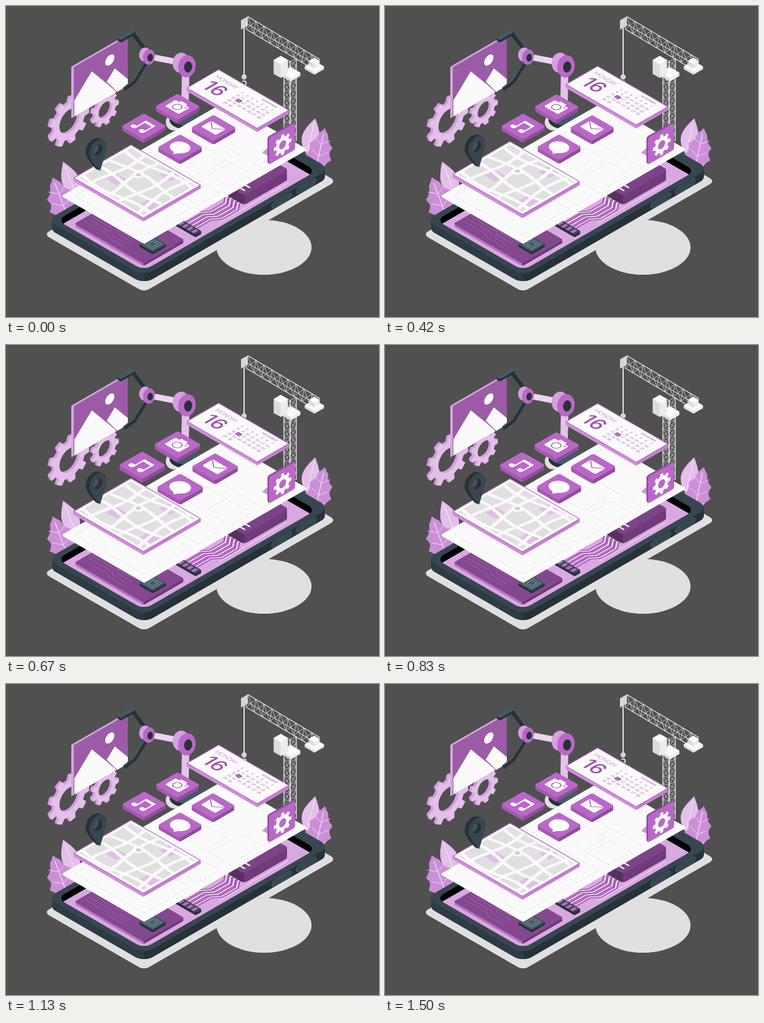
Recreate the animation shown at these times as an HTML page with a canvas. Size 600 by 500 pixels, loop 1.54 s.

```html
<!DOCTYPE html>
<html lang="en">
<head>
<meta charset="utf-8">
<title>App building site</title>
<style>
html, body { margin: 0; width: 100%; height: 100%; overflow: hidden; background: #505050; }
canvas { display: block; }
</style>
</head>
<body>
<canvas id="stage" width="600" height="500"></canvas>
<script>
const ctx = document.getElementById('stage').getContext('2d');
const LOOP = 1540, BEAT = 1500, LEAD = 20;
const K = 0.577, TAU = Math.PI * 2;
const FLOOR = [1, K, -1, K], WALL = [1, -K, 0, 1];
const PURPLE = '#ba68c8', DARK = '#37474f', DARKER = '#263238', STEEL = '#455a64';
const GREY = '#e0e0e0', PALE = '#e3bfe9', LILAC = '#d9a8e2', WHITE = '#fafafa';

function plane(m, x, y, draw) {
  ctx.save();
  ctx.transform(...m, x, y);
  draw();
  ctx.restore();
}

function box(x, y, w, h, r, fill) {
  ctx.beginPath();
  ctx.roundRect(x, y, w, h, r);
  ctx.fillStyle = fill;
  ctx.fill();
}

function trace(points) {
  ctx.beginPath();
  for (const [x, y] of points) ctx.lineTo(x, y);
}

function poly(fill, ...points) {
  trace(points);
  ctx.fillStyle = fill;
  ctx.fill();
}

function line(color, width, ...points) {
  trace(points);
  ctx.lineJoin = 'round';
  ctx.strokeStyle = color;
  ctx.lineWidth = width;
  ctx.stroke();
}

function oval(x, y, rx, ry, fill, turn = 0) {
  ctx.beginPath();
  ctx.ellipse(x, y, rx, ry, turn, 0, TAU);
  ctx.fillStyle = fill;
  ctx.fill();
}

// Points of a curve sampled for s = 0..1.
const sample = (n, at) => Array.from({ length: n + 1 }, (_, i) => at(i / n));

function seeded(seed) {
  return () => (seed = seed * 16807 % 2147483647) / 2147483647;
}

// Isometric block; x, y is the far corner of its upper face.
function slab(x, y, w, h, r, depth, top, left, right) {
  for (let d = depth; d > 0; d--) {
    plane(FLOOR, x, y + d, () => {
      const side = ctx.createLinearGradient(w - 50, h + 50, w + 50, h - 50);
      side.addColorStop(0.5, left);
      side.addColorStop(0.5, right);
      box(0, 0, w, h, r, side);
    });
  }
  plane(FLOOR, x, y, () => box(0, 0, w, h, r, top));
}

const whiteBlock = (x, y, size, depth) => slab(x, y, size, size, 0, depth, WHITE, '#dcdcdc', '#ececec');

function gear(x, y, radius, body, hole, teeth, fill) {
  const step = TAU / teeth;
  plane([0.866, -0.5, 0, 1], x, y, () => {
    ctx.beginPath();
    for (let i = 0; i < teeth; i++) {
      for (const [part, r] of [[-0.3, body], [-0.2, radius], [0.2, radius], [0.3, body]]) {
        const a = (i + part) * step;
        ctx.lineTo(r * Math.cos(a), r * Math.sin(a));
      }
    }
    ctx.closePath();
    ctx.moveTo(hole, 0);
    ctx.arc(0, 0, hole, 0, TAU);
    ctx.fillStyle = fill;
    ctx.fill('evenodd');
  });
}

function thickGear(x, y, radius) {
  for (let d = 5; d >= 0; d--) {
    gear(x - d * 0.8, y - d * 0.4, radius, radius * 0.78, radius * 0.5, 9, d ? '#d3a0dd' : PALE);
  }
}

// A leaf growing upwards from its base, with scalloped edges if it has lobes.
function leaf(x, y, length, width, turn, lobes, fill) {
  ctx.save();
  ctx.translate(x, y);
  ctx.rotate(turn);
  const edge = side => sample(48, s => {
    const scallop = lobes ? 1 - 0.25 * Math.abs(Math.cos(Math.PI * lobes * s)) : 1;
    return [side * width * Math.sin(Math.PI * s ** 0.85) * scallop, -length * s];
  });
  poly(fill, ...edge(-1), ...edge(1).reverse());
  line('#f3e3f6', 1.2, [0, 0], [0, -length * 0.88]);
  for (let i = 1; i < lobes; i++) {
    const stem = -length * (i - 0.4) / lobes;
    for (const side of [-1, 1]) line('#f3e3f6', 0.8, [0, stem], [side * width * 0.6, stem - 9]);
  }
  ctx.restore();
}

function leaves() {
  leaf(484, 238, 59, 14, 0.23, 0, PALE);
  leaf(496, 272, 78, 22, 0.22, 4, '#cb8fd7');
  leaf(114, 306, 60, 14, -0.38, 0, PALE);
  leaf(104, 352, 82, 25, -0.36, 4, '#cb8fd7');
}

function truss(x1, y1, x2, y2, dx, dy, cells) {
  const at = (i, side) => [x1 + (x2 - x1) * i / cells + dx * side, y1 + (y2 - y1) * i / cells + dy * side];
  for (const side of [0, 1]) line('#eee', 1.3, at(0, side), at(cells, side));
  for (let i = 0; i < cells; i++) {
    line(GREY, 0.8, at(i, 0), at(i + 1, 1));
    line(GREY, 0.8, at(i, 1), at(i + 1, 0));
    line(GREY, 0.8, at(i, 0), at(i, 1));
  }
}

function crane() {
  truss(447, 84, 447, 222, 10, 5, 11);
  truss(457, 89, 457, 222, 10, -5, 11);
  truss(389, 17, 505, 86, -3, 20, 9);
  line('#eee', 1, [380, 24], [496, 93]);
  plane(WALL, 378, 23, () => box(0, 0, 11, 15, 0, '#d6d6d6'));
  whiteBlock(496, 88, 16, 4);
  whiteBlock(496, 83, 9, 7);
  whiteBlock(458, 98, 16, 5);
  whiteBlock(442, 80, 12, 22);
  line(GREY, 2, [383, 34], [383, 111]);
  oval(383, 114, 4.2, 4.2, '#d6d6d6');
  ctx.beginPath();
  ctx.arc(383, 124, 3.4, -2.4, 1.6);
  ctx.strokeStyle = GREY;
  ctx.stroke();
}

function circuit() {
  const random = seeded(11);
  slab(176, 312, 111, 66, 3, 4, '#84488f', '#b873c4', '#683972');
  plane(FLOOR, 176, 312, () => {
    for (let v = 6; v < 60; v += 6) {
      const bend = 15 + random() * 60;
      line('#a164ad', 0.7, [4, v], [bend, v], [bend + 4, v + 4], [bend + 28, v + 4]);
    }
  });
  slab(236, 370, 22, 22, 1, 4, STEEL, DARKER, DARKER);
  plane(FLOOR, 236, 370, () => {
    ctx.strokeStyle = '#90a4ae';
    ctx.lineWidth = 0.8;
    for (const inset of [4, 7]) ctx.strokeRect(inset, inset, 22 - 2 * inset, 22 - 2 * inset);
  });
}

function wiring() {
  plane(FLOOR, 359, 184.5, () => {
    for (const [color, width] of [['#a75bb5', 5.5], ['#f8eefa', 1.6]]) {
      for (let u = 104; u < 126; u += 6) {
        line(color, width, [u, 182], [u, 152], [u + 8, 142], [u + 8, 118], [u, 108], [u, 60]);
      }
    }
    line('#efd9f3', 1, [134, 150], [134, 40]);
  });
  slab(282, 343, 33, 10, 2, 4, DARK, DARKER, DARKER);
  plane(FLOOR, 282, 343, () => {
    for (let i = 0; i < 4; i++) box(3 + i * 7.3, 2, 4.5, 7.5, 0, '#b56cc2');
  });
  slab(395, 229, 60, 72, 5, 15, '#7d4389', '#59305f', '#6f3c79');
  plane(FLOOR, 395, 229, () => {
    for (const v of [55, 63]) box(43, v, 11, 2.2, 1, '#fff');
  });
}

function phone() {
  slab(370, 188.8, 161, 309, 8, 0, GREY);
  slab(365, 171.5, 156, 299, 14, 13, DARK, '#2d3c44', DARKER);
  plane(FLOOR, 359, 184.5, () => {
    box(0, 0, 140, 277, 12, '#000');
    ctx.clip();
    box(10, 10, 140, 277, 4, LILAC);
  });
  circuit();
  wiring();
  for (const [x, y] of [[427.5, 317], [467, 294]]) {
    plane(WALL, x, y, () => {
      box(0, 0, 32, 10, 5, DARK);
      ctx.strokeStyle = '#50646d';
      ctx.lineWidth = 0.8;
      ctx.stroke();
    });
  }
}

function sheet() {
  slab(352, 154, 133, 263, 3, 0, WHITE);
  plane(FLOOR, 352, 154, () => {
    ctx.strokeStyle = '#dcdcdc';
    ctx.lineWidth = 0.9;
    ctx.setLineDash([3, 2.5]);
    ctx.strokeRect(10, 10, 113, 52);
    ctx.strokeRect(10, 177, 111, 74);
    for (const u of [10, 49, 89]) for (const v of [79, 130]) ctx.strokeRect(u, v, 33, 35);
  });
}

function peak(x, y, left, right) {
  const base = 82, slopeUp = 1.09, slopeDown = 1.4;
  poly(WHITE, [left, base], [left, y + (x - left) * slopeUp], [x, y],
    [right, Math.min(base, y + (right - x) * slopeDown)], [right, base]);
}

function picture() {
  plane(WALL, 106, 98, () => {
    box(-1, -1, 91, 83, 1, '#d6a4df');
    box(3, 2, 87, 80, 1, '#9c5ba7');
    peak(69, 42, 56, 90);
    line('#9c5ba7', 1.5, [56, 57], [72, 82]);
    peak(32, 25.5, 4, 70);
    oval(61, 24, 7.5, 8, WHITE);
  });
}

function joint(x, y, size) {
  const back = size * 0.55;
  oval(x - back, y - back * 0.6, size * 0.72, size * 0.9, '#d79fe0', 0.15);
  oval(x, y, size * 0.78, size, PURPLE, 0.15);
  oval(x + 2, y + 1, size * 0.36, size * 0.5, DARKER, 0.15);
}

function armBase() {
  oval(270, 187, 13, 13, GREY);
  oval(288, 183, 25, 15, DARKER);
  oval(289, 179, 24, 13, STEEL);
}

function robotArm() {
  line(DARKER, 6, [226, 90], [207, 121], [190, 134]);
  line(STEEL, 2, [223, 90], [205, 119], [190, 131]);
  line(DARKER, 7, [203, 42], [229, 76]);
  line(STEEL, 2, [207, 41], [231, 73]);
  slab(203, 37.5, 6, 24, 1, 4, STEEL, DARKER, DARKER);
  joint(230, 82, 12.5);
  line('#ecd5f0', 9.5, [239, 83], [281, 91]);
  line('#e4c2ea', 12, [289, 106], [288, 154]);
  joint(291, 97, 18);
}

function camera() {
  box(-11, -8, 22, 17, 2, '#fff');
  box(-5, -11, 10, 5, 1, '#fff');
  ctx.strokeStyle = PURPLE;
  ctx.lineWidth = 1.4;
  ctx.beginPath();
  ctx.arc(0, 0.5, 5.3, 0, TAU);
  ctx.stroke();
  box(6.5, -6, 2.5, 2, 0.5, PURPLE);
}

function note() {
  for (const u of [-8, 5]) {
    oval(u, 8, 3.8, 3.2, '#fff');
    box(u + 1.8, -9, 2, 17, 0, '#fff');
  }
  box(-6.2, -9.5, 15, 4, 0, '#fff');
}

function envelope() {
  box(-11.5, -8, 23, 16, 1.5, '#fff');
  line(PURPLE, 1.3, [-11, -7], [0, 2], [11, -7]);
}

function bubble() {
  oval(0, 0, 12.2, 11, '#fff');
  poly('#fff', [-1, 9], [4, 14.5], [8, 7]);
}

function icons(scale) {
  const cx = 277.5, cy = 198;
  ctx.save();
  ctx.translate(cx, cy);
  ctx.scale(scale, scale);
  ctx.translate(-cx, -cy);
  for (const [x, y, glyph] of [[276, 162.5, camera], [222.5, 193.5, note], [333, 196, envelope], [280, 227, bubble]]) {
    slab(x, y - 36 * K, 36, 36, 3, 6, PURPLE, '#a459b1', '#8f4d9b');
    plane(FLOOR, x, y, glyph);
  }
  ctx.restore();
}

function card(x, y, w, h) {
  slab(x, y, w, h, 1, 5, PURPLE, '#d08edb', '#c680d2');
  plane(FLOOR, x, y, () => box(1.2, 1.2, w - 2.4, h - 2.4, 0, WHITE));
}

function label(text, x, y, font, fill, align = 'left') {
  ctx.font = font;
  ctx.textAlign = align;
  ctx.fillStyle = fill;
  ctx.fillText(text, x, y);
}

function calendar() {
  const ink = '#a050b0';
  card(342, 102, 114, 52);
  plane(FLOOR, 342, 102, () => {
    label('MONDAY', 7, 14, '300 7.8px Lato, sans-serif', ink);
    label('16', 10, 39, '500 27px Inter, sans-serif', ink);
    label('NOVEMBER', 100, 8, '4.2px Lato, sans-serif', ink, 'right');
    box(56.5, 24.8, 7, 5.6, 1, '#8f4d9b');
    for (let day = 1; day <= 30; day++) {
      const column = (day - 1) % 7, row = Math.floor((day - 1) / 7);
      label(day, 52 + column * 7.9, 15.4 + row * 6.9, '4.5px Lato, sans-serif', day === 16 ? '#fff' : ink, 'center');
    }
  });
}

function settingsCard() {
  poly('#cf93da', [412, 236], [424, 225], [424, 242]);
  for (let d = 4; d >= 0; d--) {
    plane(WALL, 423 - d * 0.6, 212 - d * 0.35, () => box(0, 0, 42, 43, 3, d ? '#8f4d9b' : PURPLE));
  }
  gear(445, 223, 16.5, 12.5, 6.5, 8, WHITE);
}

function cityMap() {
  const w = 113, h = 93;
  card(201, 223, w, h);
  plane(FLOOR, 201, 223, () => {
    ctx.beginPath();
    ctx.rect(5, 5, w - 10, h - 10);
    ctx.clip();
    box(0, 0, w, h, 0, GREY);
    for (const [u, v] of [[28, 52], [66, 4], [90, 60]]) box(u, v, 17, 16, 0, '#e0bfe8');
    for (let i = 0; i < 4; i++) {
      line(WHITE, 4.6, ...sample(20, s => [w * s, 13 + i * 23 + 4 * Math.sin(s * 6 + i * 2)]));
      line(WHITE, 4.6, ...sample(20, s => [25 + i * 24 + 4 * Math.sin(s * 5 + i * 3), h * s]));
    }
    oval(48, 36, 7, 7, WHITE);
    oval(48, 36, 3, 3, '#e0bfe8');
  });
}

function pin() {
  for (let d = 6; d >= 0; d--) {
    plane([0.866, -0.4, 0.05, 1], 148 - d, 232 - d * 0.35, () => {
      ctx.beginPath();
      ctx.arc(0, 0, 16, Math.PI - 0.35, 0.35);
      ctx.quadraticCurveTo(10, 18, 2, 34);
      ctx.quadraticCurveTo(-10, 18, -15, 5.5);
      ctx.moveTo(8, 0);
      ctx.arc(0, 0, 8, 0, TAU);
      ctx.fillStyle = d ? DARKER : DARK;
      ctx.fill('evenodd');
    });
  }
}

// Linear rise from start to top, linear fall to end.
const pulse = (p, start, top, end) =>
  Math.max(0, Math.min((p - start) / (top - start), (end - p) / (end - top)));

function render() {
  const p = Math.min(1, (performance.now() % LOOP + LEAD) / BEAT);
  const lift = -10 * pulse(p, 0, 0.5, 1);
  const scale = 1 + 0.1 * (pulse(p, 0, 0.1, 0.3) + pulse(p, 0.4, 0.5, 0.6));
  const floating = draw => plane([1, 0, 0, 1], 0, lift, draw);

  box(0, 0, 600, 500, 0, '#505050');
  oval(415, 388, 76.5, 44, GREY);
  leaves();
  crane();
  phone();
  armBase();
  sheet();
  thickGear(160, 167, 25);
  thickGear(102, 185, 37);
  picture();
  robotArm();
  floating(calendar);
  icons(scale);
  settingsCard();
  floating(cityMap);
  floating(pin);
  requestAnimationFrame(render);
}
render();
</script>
</body>
</html>
```
